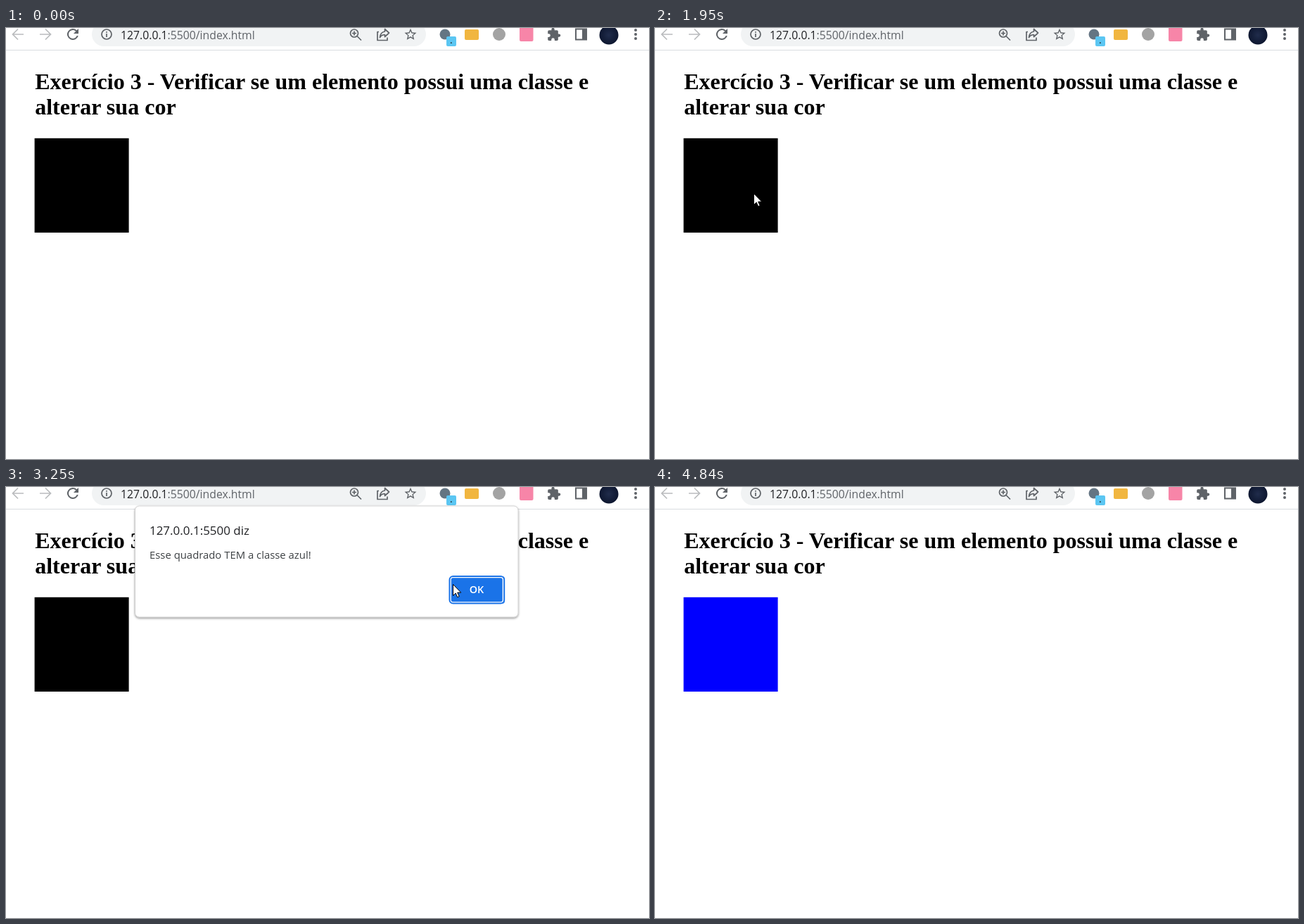
Animation, 914 px wide and 613 px high, one loop 5700 ms. Source, as an HTML page:

```html
<!DOCTYPE html>
<html lang="pt-BR">
<head>
<meta charset="utf-8">
<title>Exercício 3</title>
<style>
  html, body { margin: 0; width: 100%; height: 100%; overflow: hidden; background: #fff; }
  svg { display: block; }
  .ui { font-family: "Open Sans", "Noto Sans", sans-serif; }
  .heading { font: bold 32.04px "Liberation Serif", serif; font-variant-ligatures: none; }
  .icon { fill: #5f6368; }
  .line { fill: none; stroke: #5f6368; stroke-width: 1.7; }
  .disabled { stroke: #babcbe; }

  .square, .dialog, .ring, .face, .cursor { animation: 5700ms linear infinite; }
  .square { animation-name: recolor; }
  .dialog { animation-name: dialog; }
  .ring { animation-name: unfocus; }
  .face { animation-name: hover; }
  .cursor { animation-name: wander; }

  @keyframes recolor {
    0%, 65.6% { fill: #000; }
    65.61%, 100% { fill: #00f; }
  }
  @keyframes dialog {
    0%, 35.2% { opacity: 0; transform: translateY(-15px); animation-timing-function: ease-out; }
    39%, 65.6% { opacity: 1; transform: none; }
    66.84% { opacity: .92; transform: translateY(-7.3px); }
    68.07% { opacity: .5; transform: translateY(-13px); }
    69.3%, 100% { opacity: 0; transform: translateY(-17px); }
  }
  @keyframes unfocus {
    0%, 65.6% { opacity: 1; }
    65.61%, 100% { opacity: 0; }
  }
  @keyframes hover {
    0%, 65.6% { fill: #1a73e8; }
    65.61%, 100% { fill: #2b7de9; }
  }
  @keyframes wander {
    0%, 4.55% { opacity: 0; transform: translate(718px, 582px); }
    4.56% { opacity: 1; transform: translate(718px, 582px); }
    9.39% { transform: translate(360px, 375px); }
    11.75% { transform: translate(205px, 322px); }
    14.21% { transform: translate(160px, 348px); }
    20.18%, 26.14% { transform: translate(146px, 335px); }
    32.98% { transform: translate(140px, 238px); }
    34.2%, 51.05% { transform: translate(140px, 235px); }
    54.56% { transform: translate(500px, 140px); }
    55.79% { transform: translate(622px, 123px); }
    57.01%, 58.2% { transform: translate(635px, 138px); }
    61.93%, 68.07% { transform: translate(635px, 147px); }
    72.81% { transform: translate(400px, 169px); }
    75.26% { transform: translate(297px, 230px); }
    78.95% { transform: translate(450px, 400px); }
    83.68%, 84.9% { opacity: 1; transform: translate(755px, 572px); }
    84.91%, 100% { opacity: 0; transform: translate(755px, 572px); }
  }
</style>
</head>
<body>
<svg width="914" height="613" viewBox="0 0 914 613">
  <defs>
    <radialGradient id="night">
      <stop stop-color="#202c4b"/><stop offset="1" stop-color="#0e1730"/>
    </radialGradient>
    <filter id="shadow" x="-5%" y="-10%" width="110%" height="125%">
      <feDropShadow dx="0" dy="1.5" stdDeviation="1.8" flood-opacity=".42"/>
    </filter>
  </defs>

  <!-- Toolbar -->
  <path d="M0 31.5H914" stroke="#dadce0"/>
  <rect x="122" y="-8" width="475" height="34" rx="17" fill="#f1f3f4"/>
  <path class="line disabled" d="M25 9H10M17 1.5L9.5 9l7.5 7.5M48 9h15M56 1.5L63.5 9l-7.5 7.5"/>
  <path class="icon" transform="translate(83 -3)" d="M17.65 6.35A8 8 0 1 0 19.73 14h-2.08A6 6 0 1 1 12 6c1.66 0 3.14.69 4.22 1.78L13 11h7V4z"/>
  <circle class="line" cx="143" cy="9" r="7"/>
  <path class="line" d="M143 8v5M143 5v1.7"/>
  <text class="ui" x="163" y="15.5" font-size="15.75" fill="#5f6368"><tspan fill="#202124">127.0.0.1</tspan>:5500/index.html</text>
  <circle class="line" cx="495" cy="7.5" r="5.5"/>
  <path class="line" d="M499 11.5l6 6M492 7.5h6M495 4.5v6"/>
  <path class="line" stroke-linejoin="round" d="M530 5.5h-2v12h14v-4M538.5 1.5l6 5.5-6 5.5V9.5c-3.5 0-5.5 1.5-7 4 .5-5 3-8 7-8.5z"/>
  <path class="icon" transform="translate(564.8 -1) scale(.85)" d="M22 9.24l-7.19-.62L12 2 9.19 8.63 2 9.24l5.46 4.73L5.82 21 12 17.27 18.18 21l-1.63-7.03zM12 15.4l-3.76 2.27 1-4.28-3.32-2.88 4.38-.38L12 6.1l1.71 4.04 4.38.38-3.32 2.88 1 4.28z"/>
  <circle cx="624" cy="9" r="7.5" fill="#647583"/>
  <rect x="626" y="12" width="14" height="14" rx="2" fill="#5bc6f2"/>
  <text class="ui" x="631.3" y="22" font-size="11" font-weight="700" fill="#222">.</text>
  <rect x="652" y="2" width="20" height="15" rx="2" fill="#f1b640"/>
  <circle cx="701" cy="9" r="9" fill="#a3a3a3"/>
  <rect x="730" y="-2" width="19.5" height="21" rx="2" fill="#f785a8"/>
  <path class="icon" transform="translate(768.5 -1) scale(.86)" d="M20.5 11H19V7c0-1.1-.9-2-2-2h-4V3.5a2.5 2.5 0 0 0-5 0V5H4c-1.1 0-2 .9-2 2v3.8h1.5a2.7 2.7 0 0 1 0 5.4H2V20c0 1.1.9 2 2 2h3.8v-1.5a2.7 2.7 0 0 1 5.4 0V22H17c1.1 0 2-.9 2-2v-4h1.5a2.5 2.5 0 0 0 0-5z"/>
  <path class="icon" d="M809 .5h17v17h-17zM811 2.5v13h8v-13z" fill-rule="evenodd"/>
  <circle cx="857" cy="10" r="13.5" fill="url(#night)"/>
  <g class="icon"><circle cx="895" cy="3" r="2"/><circle cx="895" cy="9" r="2"/><circle cx="895" cy="15" r="2"/></g>

  <!-- Page -->
  <text class="heading" x="41.2" y="87">Exercício 3 - Verificar se um elemento possui uma classe e</text>
  <text class="heading" x="41.2" y="123">alterar sua cor</text>
  <rect class="square" x="40.6" y="156.8" width="134" height="134.2"/>

  <!-- Alert -->
  <g class="dialog ui">
    <rect x="183.5" y="27" width="544.5" height="158" rx="6" fill="#fff" stroke="#c8c8c8" stroke-width=".8" filter="url(#shadow)"/>
    <text x="204" y="68" font-size="16.95" fill="#202124">127.0.0.1:5500 diz</text>
    <text x="204" y="102" font-size="14.87" fill="#3c4043">Esse quadrado TEM a classe azul!</text>
    <rect class="face" x="631" y="127" width="78" height="39" rx="4"/>
    <g class="ring" fill="none">
      <rect x="631.3" y="127.8" width="75.9" height="37" rx="4" stroke="#fff" stroke-width="3"/>
      <rect x="630.5" y="127" width="77.7" height="38.5" rx="5" stroke="#1a73e8" stroke-width="2"/>
    </g>
    <text x="669" y="151" text-anchor="middle" font-size="14.4" font-weight="600" fill="#fff">OK</text>
  </g>

  <path class="cursor" fill="#fff" stroke="#000" d="M.5.5v16l3.7-3.5 2.5 5.7 2.5-1.1-2.5-5.5h5z"/>
</svg>
</body>
</html>
```
